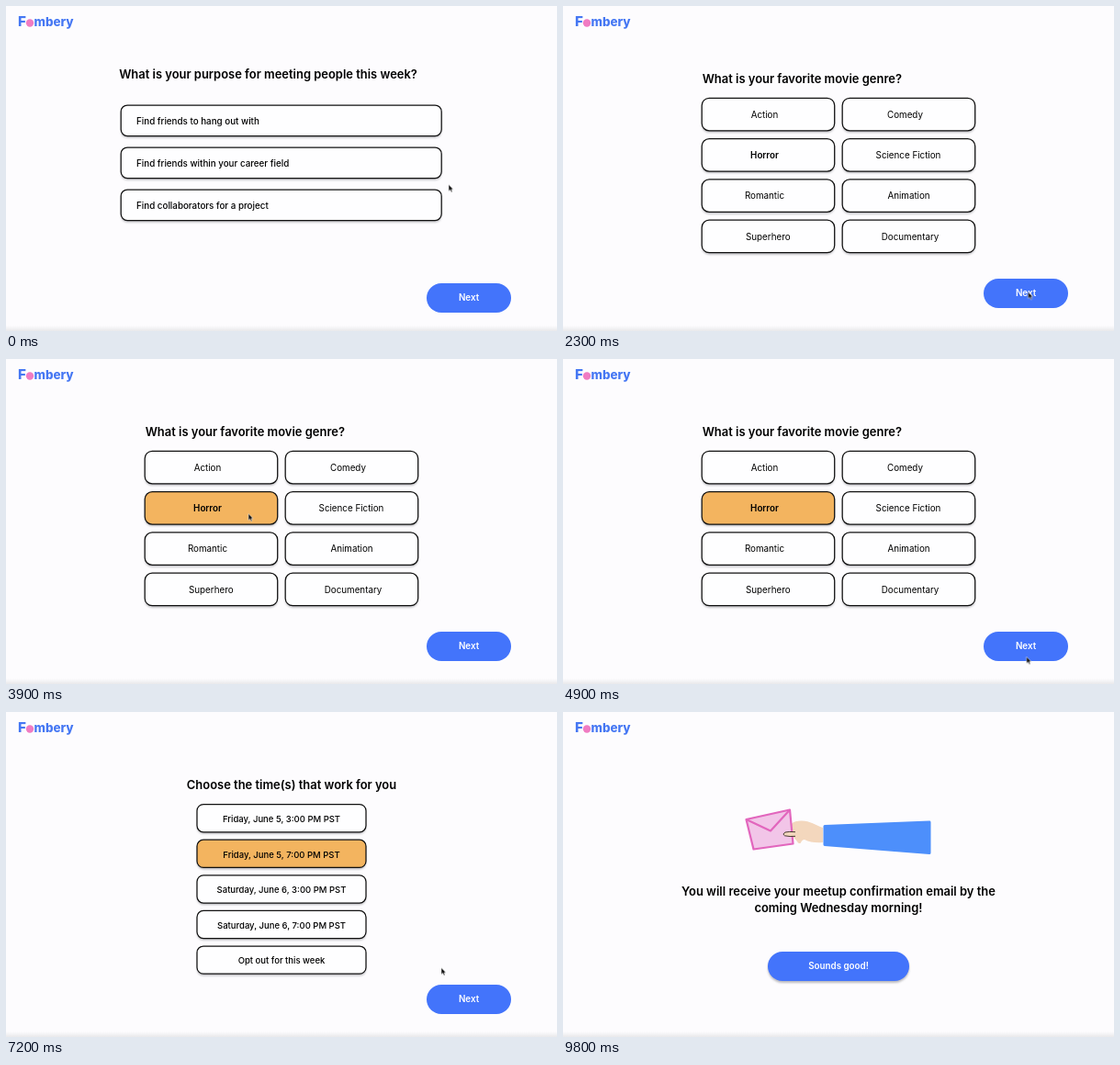
Write an HTML page that moves like this. It is 600 by 354 pixels and loops after 9900 ms.

```html
<!DOCTYPE html>
<html lang="en">
<head>
<meta charset="utf-8">
<title>Meetup sign-up</title>
<style>
  html, body { margin: 0; width: 100%; height: 100%; overflow: hidden; background: #fdfcfe; }
  svg { display: block; width: 600px; height: 354px; }
  text { font: 500 9.8px Inter, "Open Sans", sans-serif; fill: #000; }
  .mid { text-anchor: middle; }
  .title { font-weight: 600; font-size: 12.95px; text-anchor: middle; }
  .genre { font-weight: 400; }
  .strong { font-weight: 600; }
  .time { font-size: 9.5px; }
  .cta { font-weight: 600; fill: #fff; text-anchor: middle; }
  .brand { font-weight: 800; font-size: 13.4px; fill: #4577f3; }
  .brand.cap { font-size: 15.2px; }
  .box { fill: #fefeff; stroke: #111; stroke-width: 1.25; }
  .shade { fill: #77777f; opacity: .5; filter: url(#soft); }
  .blue { fill: #4374fb; }

  .screen, .pick, #cursor { animation: 9.9s infinite; }
  .screen, .pick { animation-timing-function: step-end; }
  #purpose { animation-name: purpose; }
  #genres { animation-name: genres; }
  #times { animation-name: times; }
  #done { animation-name: done; }
  @keyframes purpose { 0% { visibility: visible } 20.2%, 100% { visibility: hidden } }
  @keyframes genres { 0% { visibility: hidden } 20.2% { visibility: visible } 50.5%, 100% { visibility: hidden } }
  @keyframes times { 0% { visibility: hidden } 50.5% { visibility: visible } 76.76%, 100% { visibility: hidden } }
  @keyframes done { 0% { visibility: hidden } 76.76%, 100% { visibility: visible } }

  #purpose .pick { animation-name: pickPurpose; }
  #genres .pick { animation-name: pickGenre; }
  #times .pick { animation-name: pickTime; }
  @keyframes pickPurpose { 0% { fill: #fefeff } 9.09%, 100% { fill: #f3b45f } }
  @keyframes pickGenre { 0% { fill: #fefeff } 36.36%, 100% { fill: #f3b45f } }
  @keyframes pickTime { 0% { fill: #fefeff } 65.65%, 100% { fill: #f3b45f } }

  #cursor { animation-name: roam; animation-timing-function: ease-in-out; }
  @keyframes roam {
    0%, 3.03% { transform: translate(482px, 194.5px) }
    5.05%, 11.11% { transform: translate(458px, 180px); animation-timing-function: ease-in }
    15.15% { transform: translate(502px, 261px); animation-timing-function: ease-out }
    18.18%, 26.26% { transform: translate(506.5px, 311.5px) }
    35.35%, 40.4% { transform: translate(264px, 168.5px) }
    46.46% { transform: translate(505px, 327px) }
    54.54%, 56.57% { transform: translate(504px, 318px); animation-timing-function: ease-in }
    59.6% { transform: translate(466.2px, 240.8px); animation-timing-function: ease-out }
    64.65%, 68.69% { transform: translate(370px, 160px) }
    74.75%, 76.76% { transform: translate(505px, 314px) }
    80.8% { transform: translate(489.4px, 308.2px) }
    84.85%, 86.87% { transform: translate(503px, 308px) }
    94.95%, 100% { transform: translate(440px, -16px) }
  }
</style>
</head>
<body>
<svg viewBox="0 0 600 354" xmlns="http://www.w3.org/2000/svg">
  <defs>
    <filter id="soft" x="-10%" y="-20%" width="120%" height="150%"><feGaussianBlur stdDeviation="1"/></filter>
    <linearGradient id="edge" x2="0" y2="1">
      <stop offset="0" stop-color="#fdfcfe"/><stop offset="1" stop-color="#e9e9eb"/>
    </linearGradient>
  </defs>
  <rect width="600" height="354" fill="#fdfcfe"/>
  <rect y="348" width="600" height="6" fill="url(#edge)"/>

  <text class="brand cap" x="13" y="21.5">F</text>
  <circle cx="26" cy="18.5" r="4.2" fill="#f07cc3"/>
  <text class="brand" x="30.5" y="21.5">mbery</text>

  <g id="purpose" class="screen">
    <text class="title" x="285.5" y="79">What is your purpose for meeting people this week?</text>
  </g>
  <g id="genres" class="screen">
    <text class="title" x="260.3" y="84">What is your favorite movie genre?</text>
  </g>
  <g id="times" class="screen">
    <text class="title" x="311" y="83.5">Choose the time(s) that work for you</text>
  </g>
  <g id="done" class="screen">
    <path d="M285 124.500L399 120V153.500L285 144.500Z" fill="#4d8ffb" stroke="#4d8ffb" stroke-width="3" stroke-linejoin="round"/>
    <path d="M283 126C275 123 268 118 259 118.500Q250 119 248 123L249 134L255 141Q256 144 259 142.500Q260 139 263 139Q271 143 283 142Z" fill="#f3d7bd"/>
    <g stroke="#e266bd" stroke-width="2.2" stroke-linejoin="round">
      <path d="M199.500 117L247 106.500L250.500 143.500L207.500 149.500Z" fill="#f2c5e8"/>
      <path d="M199.500 117L226 129.500L247 106.500" fill="none"/>
    </g>
    <path d="M248 130.500L260 129L261 138L250 136Z" fill="#f3d7bd"/>
    <path d="M253 130.700Q246 130 242 131Q238.500 133 241.500 134.800Q247 136 253 135.300" fill="#f3d7bd" stroke="#33291f" stroke-width=".9"/>
    <text class="title" x="300" y="199.500">You will receive your meetup confirmation email by the</text>
    <text class="title" x="300" y="217.700">coming Wednesday morning!</text>
  </g>

  <path id="cursor" d="M0 0V7.200L1.700 5.700L2.900 8.300L4.100 7.800L3 5.200H5.200Z" fill="#111" stroke="#fff" stroke-width=".5"/>
</svg>
<script>
  const NS = "http://www.w3.org/2000/svg";
  const byId = id => document.getElementById(id);

  function add(parent, tag, attrs, label = "") {
    const el = document.createElementNS(NS, tag);
    for (const key in attrs) el.setAttribute(key, attrs[key]);
    el.textContent = label;
    parent.append(el);
  }

  function button(parent, frame, label, text, picked) {
    add(parent, "rect", { ...frame, y: frame.y + 2, class: "shade" });
    add(parent, "rect", { ...frame, class: picked ? "box pick" : "box" });
    add(parent, "text", text, label);
  }

  function pill(parent, frame, label, shaded) {
    const shape = { ...frame, height: 32, rx: 16 };
    if (shaded) add(parent, "rect", { ...shape, y: frame.y + 2, class: "shade" });
    add(parent, "rect", { ...shape, class: "blue" });
    add(parent, "text", { x: frame.x + frame.width / 2, y: frame.y + 19, class: "cta" }, label);
  }

  const purpose = byId("purpose"), genres = byId("genres"), times = byId("times");

  ["Find friends to hang out with", "Find friends within your career field", "Find collaborators for a project"]
    .forEach((label, i) => {
      const y = 108 + i * 46;
      button(purpose, { x: 125.2, y, width: 349, height: 33.5, rx: 7 }, label, { x: 142, y: y + 20.7 }, i === 1);
    });

  // Label and its centre, filled row by row.
  [["Action", 219.5], ["Comedy", 372.5], ["Horror", 219.5], ["Science Fiction", 376],
   ["Romantic", 219.5], ["Animation", 376.5], ["Superhero", 223.3], ["Documentary", 378]]
    .forEach(([label, x], i) => {
      const y = 100.3 + (i >> 1) * 44.3, picked = label === "Horror";
      button(genres, { x: 151.2 + (i % 2) * 153, y, width: 144.5, height: 35.5, rx: 8 }, label,
        { x, y: y + 21.3, class: picked ? "mid strong" : "mid genre" }, picked);
    });

  ["Friday, June 5, 3:00 PM PST", "Friday, June 5, 7:00 PM PST", "Saturday, June 6, 3:00 PM PST",
   "Saturday, June 6, 7:00 PM PST", "Opt out for this week"]
    .forEach((label, i) => {
      const y = 100.6 + i * 38.6;
      button(times, { x: 208, y, width: 184, height: 30.2, rx: 7 }, label,
        { x: 300, y: y + 19.3, class: "mid time" }, i === 1);
    });

  pill(purpose, { x: 458, y: 302, width: 92 }, "Next");
  pill(genres, { x: 458, y: 297, width: 92 }, "Next");
  pill(times, { x: 458, y: 297, width: 92 }, "Next");
  pill(byId("done"), { x: 223, y: 261, width: 154 }, "Sounds good!", true);
</script>
</body>
</html>
```
